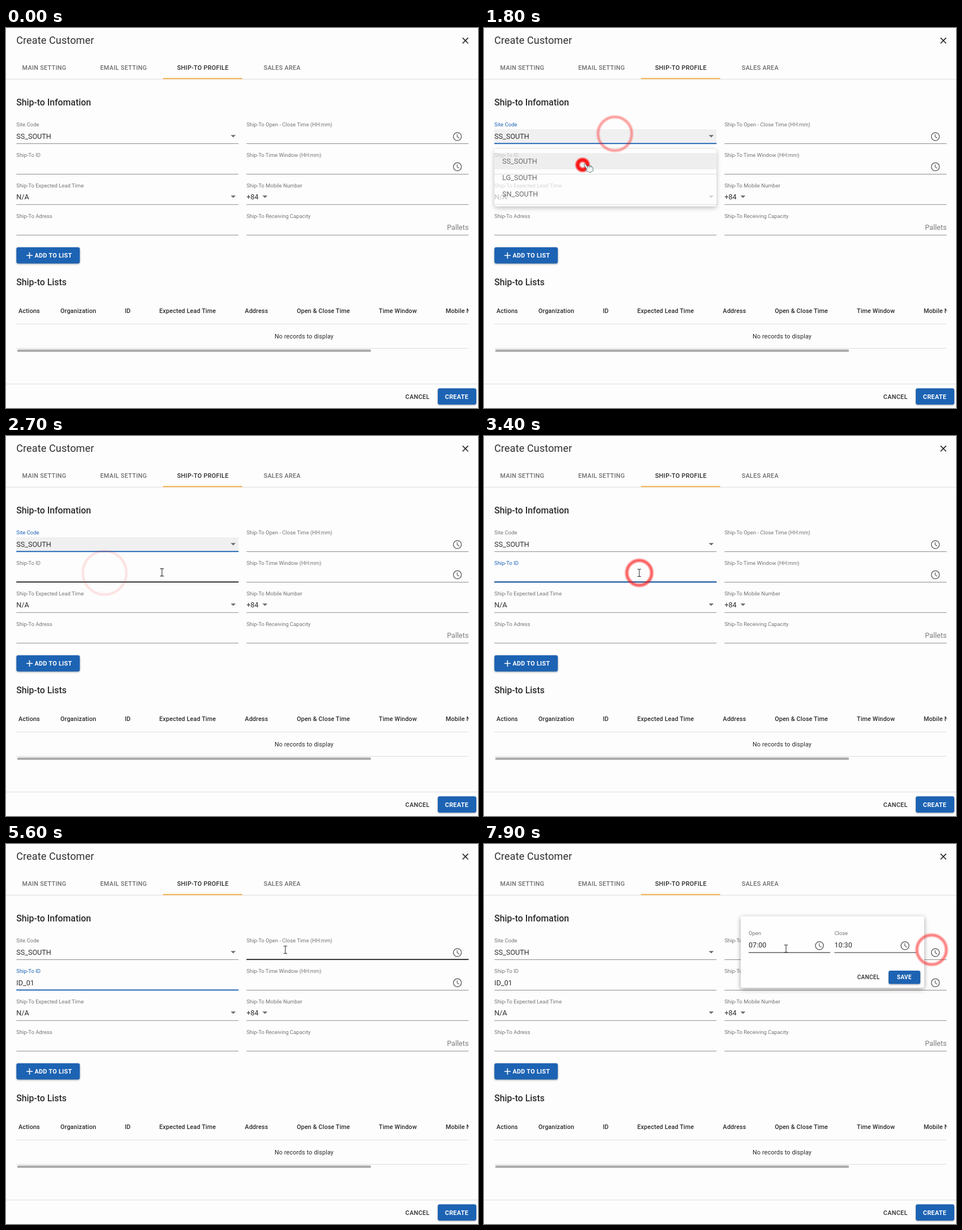
An HTML page that plays this animation: 833x672 px, repeating every 8000 ms.

```html
<!DOCTYPE html>
<html lang="en">
<head>
<meta charset="utf-8">
<title>Create Customer</title>
<style>
  html, body { margin: 0; width: 100%; height: 100%; overflow: hidden; background: #fdfdfd; }
  svg { display: block; width: 100vw; height: 100vh; }
  text { font-family: Roboto, Arial, sans-serif; white-space: pre; }
  .title { font-size: 18px; letter-spacing: .0075em; fill: #2f2f2f; }
  .head { font-size: 15.84px; font-weight: 500; fill: #2b2b2b; }
  .tab, .btn { font-size: 10.8px; font-weight: 500; letter-spacing: .02857em; fill: #6d6d6d; }
  .tab.on, .btn { fill: #2b2b2b; }
  .btn.solid { font-weight: 700; fill: #fff; }
  .btn.small { font-size: 10px; }
  .label { font-size: 9.45px; fill: #757575; }
  .value { font-size: 12.6px; fill: #2e2e2e; }
  .muted { fill: #7b7b7b; }
  .th, .td { font-size: 10.8px; letter-spacing: .01071em; fill: #2b2b2b; }
  .th { font-weight: 500; }
  .blue { fill: #1d63b3; filter: drop-shadow(0 1px 1.5px rgba(0,0,0,.35)); }
  .paper { fill: #fefefe; filter: drop-shadow(0 3px 4px rgba(0,0,0,.25)) drop-shadow(0 1px 3px rgba(0,0,0,.14)); }
</style>
</head>
<body>
<svg id="stage" viewBox="0 0 833 672"></svg>
<script>
const LOOP = 8000, FIELD_W = 392, LEFT = 18.3, RIGHT = 424.4;
const BLUE = '#1c62b4', GREY = '#757575';

const text = (x, y, s, cls, extra = '') => `<text x="${x}" y="${y}" class="${cls}" ${extra}>${s}</text>`;
const rect = (x, y, w, h, attrs) => `<rect x="${x}" y="${y}" width="${w}" height="${h}" ${attrs}/>`;
const button = (x, y, w, h) => rect(x, y, w, h, 'rx="3.4" class="blue"');
const clock = (x, y) => `<g transform="translate(${x} ${y})" fill="none" stroke="#6b6b6b">
  <circle r="7.1" stroke-width="1.5"/><path d="M-.3 -4.2V.4L3.4 2.6" stroke-width="1.3"/></g>`;
const arrow = (x, y, id = '') => `<path id="${id}" d="M-4.4 -2.2H4.4L0 2.2Z" transform="translate(${x} ${y})" fill="#6b6b6b"/>`;

const fields = [
  { id: 'site', x: LEFT, y: 204.5, label: 'Site Code' },
  { id: 'code', x: LEFT, y: 258.5, label: 'Ship-To ID' },
  { id: 'lead', x: LEFT, y: 312.2, label: 'Ship-To Expected Lead Time' },
  { id: 'address', x: LEFT, y: 366.2, label: 'Ship-To Adress' },
  { id: 'open', x: RIGHT, y: 204.5, label: 'Ship-To Open - Close Time (HH:mm)' },
  { id: 'win', x: RIGHT, y: 258.5, label: 'Ship-To Time Window (HH:mm)' },
  { id: 'mobile', x: RIGHT, y: 312.2, label: 'Ship-To Mobile Number' },
  { id: 'cap', x: RIGHT, y: 366.2, label: 'Ship-To Receiving Capacity' }
];
const field = f => text(f.x, f.y - 30.6, f.label, 'label', `id="${f.id}-label"`) +
  rect(f.x, f.y - .5, FIELD_W, 1, 'fill="#8e8e8e"') +
  rect(f.x, f.y - 1.2, FIELD_W, 1.8, `id="${f.id}-hover" fill="#1c1c1c"`) +
  rect(-FIELD_W / 2, -1.2, FIELD_W, 1.9, `id="${f.id}-focus" fill="${BLUE}"`);

const tabs = [[28.6, 'MAIN SETTING'], [166.2, 'EMAIL SETTING'], [302, 'SHIP-TO PROFILE'], [454.8, 'SALES AREA']];
const columns = [[22, 'Actions'], [96, 'Organization'], [209.7, 'ID'], [270.6, 'Expected Lead Time'],
  [421.6, 'Address'], [513.2, 'Open &amp; Close Time'], [658, 'Time Window'], [776, 'Mobile Number']];
const options = ['SS_SOUTH', 'LG_SOUTH', 'SN_SOUTH'];

const stage = document.getElementById('stage');
stage.innerHTML = `
<defs>
  <filter id="soft" x="-50%" y="-50%" width="200%" height="200%"><feGaussianBlur stdDeviation="1"/></filter>
  <clipPath id="table"><rect x="18" y="480" width="798.5" height="95"/></clipPath>
</defs>
${rect(0, 0, 833, 672, 'fill="#fdfdfd"')}
${text(18.2, 28.2, 'Create Customer', 'title')}
<path d="M805.8 17.4L815.6 27.2M815.6 17.4L805.8 27.2" stroke="#222" stroke-width="1.6"/>
${tabs.map(([x, s], i) => text(x, 73.8, s, i === 2 ? 'tab on' : 'tab')).join('')}
${rect(0, 90, 833, 1, 'fill="#dcdcdc"')}
${rect(277, 88.4, 140, 2, 'fill="#f3b14c"')}
${text(18.2, 136.6, 'Ship-to Infomation', 'head')}
${rect(LEFT, 179, FIELD_W, 25, 'id="site-bg" fill="#f0f0f1"')}
${fields.map(field).join('')}
${text(LEFT, 195.5, options[0], 'value')}
${text(LEFT, 249.5, '', 'value', 'id="typed"')}
${text(LEFT, 303, 'N/A', 'value')}
${text(RIGHT, 303, '+84', 'value')}
${text(816.4, 357, 'Pallets', 'value muted', 'text-anchor="end"')}
${arrow(401, 191.4, 'site-arrow')}${arrow(401, 298.4)}${arrow(457, 298.4)}
${clock(796.6, 192)}${clock(796.6, 245.4)}
${rect(0, 0, 1.1, 16.5, 'id="caret" fill="#222"')}
${button(18.3, 387.8, 112, 28.6)}
<path d="M36 402.2H47M41.5 396.7V407.7" stroke="#fff" stroke-width="1.6"/>
${text(50.4, 406.1, 'ADD TO LIST', 'btn solid')}
${text(18.2, 455, 'Ship-to Lists', 'head')}
<g clip-path="url(#table)">
  ${columns.map(([x, s]) => text(x, 504.2, s, 'th')).join('')}
  ${rect(18, 523, 799, 1, 'fill="#dedede"')}
  ${text(474, 548.9, 'No records to display', 'td')}
  ${rect(18, 566, 799, 1, 'fill="#dedede"')}
</g>
${rect(20, 568.6, 624, 4.2, 'rx="1.5" fill="#ababab"')}
${rect(0, 629, 833, 1, 'fill="#dcdcdc"')}
${text(704.8, 655.6, 'CANCEL', 'btn')}
${button(762, 637.2, 68, 28.8)}
${text(774.8, 655.6, 'CREATE', 'btn solid')}
<g id="menu">
  ${rect(18.3, 214, FIELD_W, 101.4, 'rx="3.6" class="paper"')}
  ${rect(18.3, 221.2, FIELD_W, 28.8, 'fill="#e9e9ea"')}
  ${options.map((s, i) => text(32.3, 240 + i * 28.9, s, 'value')).join('')}
</g>
<g id="popover">
  ${rect(453, 127.6, 324, 126.8, 'rx="3.6" class="paper"')}
  ${text(467, 161, 'Open', 'label')}${text(618.4, 161, 'Close', 'label')}
  ${text(467, 183.4, '07:00', 'value')}${text(618.4, 183.4, '10:30', 'value')}
  ${rect(467, 191.3, 144, 1.4, 'id="line-open" fill="#555"')}
  ${rect(618.4, 191.3, 144.4, 1.4, 'id="line-close" fill="#555"')}
  ${clock(592, 179.8)}${clock(743, 179.8)}
  ${text(658.8, 239.2, 'CANCEL', 'btn small')}
  ${button(714, 224, 56, 23.6)}
  ${text(728.8, 239.2, 'SAVE', 'btn solid small')}
</g>
<g id="rings"></g>
<g id="cursor">
  <path id="hand" d="M-1.5 1Q-1.5 -.6 0 -.6Q1.5 -.6 1.5 1V6Q4 5.4 4.8 6.7Q6.6 6.3 7 7.7Q8.4 7.6 8.4 9.5V12.6Q8.4 15 7 17.4H0Q-1 15 -4.3 11Q-5 9 -3.3 9L-1.5 10.4Z
    M1.5 6V9.5M4.6 7V10M7 8V10.5" fill="#eff6f7" stroke="#60747b" stroke-width=".9"/>
  <path id="arrow" d="M0 0V15L3.5 11.7L6 17L8.3 16L5.9 10.8H10.6Z" fill="#fff" stroke="#333" stroke-width=".9"/>
  <path id="beam" d="M-3.2 -6.5H-1Q0 -6.5 0 -5.5Q0 -6.5 1 -6.5H3.2M0 -5.5V5.5M-3.2 6.5H-1Q0 6.5 0 5.5Q0 6.5 1 6.5H3.2" fill="none" stroke="#333" stroke-width="1.1"/>
</g>`;

const $ = id => document.getElementById(id);
const set = (id, name, value) => $(id).setAttribute(name, value);
const show = (id, on) => set(id, 'opacity', +on);
const clamp = v => Math.max(0, Math.min(1, v));
const smooth = p => p * p * (3 - 2 * p);
const easeOut = p => 1 - (1 - p) ** 3;
const within = (t, [a, b]) => t >= a && t < b;
const lastAt = (list, t) => list.filter(k => k[0] <= t).pop();

// time, x, y
const path = [[400, 345, 60], [900, 231, 186], [1250, 231, 186], [1620, 174, 242], [1760, 174, 242],
  [2200, 330, 204], [2750, 274, 242], [5200, 274, 242], [5600, 493, 187], [6300, 493, 187],
  [6800, 745, 191], [7130, 790, 187], [7400, 790, 187], [7900, 533, 185]];
const pointers = [[0, ''], [400, 'hand'], [600, 'arrow'], [780, 'hand'], [2350, 'beam'], [3700, ''],
  [5200, 'beam'], [7000, 'hand'], [7460, 'arrow'], [7580, 'beam']];
const clicks = [[1050, 231, 187], [1685, 174, 242], [2885, 274, 242], [6073, 492, 187], [7264, 790, 187]];
const focus = { site: [1050, 2900], code: [2900, 6090], open: [6090, 7350] };
const typing = [[0, ''], [3700, 'I'], [3900, 'ID'], [4200, 'ID_'], [4300, 'ID_0'], [4400, 'ID_01']];
const carets = [[3900, 4500], [4900, 5400], [6100, 6500], [6700, 7350]];
const MENU = [1050, 1900], POPOVER = 7400;

$('rings').innerHTML = clicks.map(([, x, y], i) =>
  `<circle id="ring${i}" cx="${x}" cy="${y}" fill="none" stroke="#fb1212" filter="url(#soft)"/>`).join('');

function pointerAt(t) {
  const i = path.findIndex(k => k[0] > t);
  if (i < 0) return path[path.length - 1].slice(1);
  if (!i) return path[0].slice(1);
  const a = path[i - 1], b = path[i], p = smooth((t - a[0]) / (b[0] - a[0]));
  return [a[1] + (b[1] - a[1]) * p, a[2] + (b[2] - a[2]) * p];
}

function grow(id, p, opacity, x, y) {
  const sx = .75 + .25 * p, sy = .5625 + .4375 * p;
  set(id, 'transform', `translate(${x} ${y}) scale(${sx} ${sy}) translate(${-x} ${-y})`);
  show(id, opacity);
}

function drawFields(t, x, y, pointer) {
  const blocked = within(t, MENU) || t >= POPOVER;
  for (const f of fields) {
    const span = focus[f.id], on = !!span && within(t, span);
    const over = pointer && !blocked && x > f.x && x < f.x + FIELD_W && y > f.y - 26 && y <= f.y;
    $(f.id + '-label').style.fill = on ? BLUE : GREY;
    show(f.id + '-hover', over);
    show(f.id + '-focus', on);
    const p = on ? easeOut(clamp((t - span[0]) / 200)) : 0;
    set(f.id + '-focus', 'transform', `translate(${f.x + FIELD_W / 2} ${f.y}) scale(${p} 1)`);
  }
  show('site-bg', within(t, [1750, focus.site[1]]));
  set('site-arrow', 'transform', `translate(401 191.4) scale(1 ${within(t, [1050, 1750]) ? -1 : 1})`);
}

function drawCaret(t) {
  const typed = $('typed');
  typed.textContent = lastAt(typing, t)[1];
  show('caret', carets.some(c => within(t, c)));
  const inCode = t < 6000;
  set('caret', 'x', inCode ? LEFT + typed.getComputedTextLength() : RIGHT);
  set('caret', 'y', inCode ? 237 : 183);
}

function drawCursor(t, x, y, pointer) {
  for (const kind of ['hand', 'arrow', 'beam']) show(kind, kind === pointer);
  const pressed = clicks.some(([c]) => within(t, [c - 50, c + 300]));
  const tilt = pointer === 'hand' && pressed ? -32 : 0;
  set('cursor', 'transform', `translate(${x} ${y}) rotate(${tilt})`);
}

function drawRings(t) {
  clicks.forEach(([start], i) => {
    const age = (t - start) / 1000, id = 'ring' + i;
    const alive = age >= 0 && age < 1.15;
    show(id, 0);
    if (!alive) return;
    set(id, 'r', 5 + 33 * age);
    set(id, 'stroke-width', 7.5 - 4 * age);
    set(id, 'opacity', clamp(1.25 * (1 - age / 1.15)));
  });
}

function draw(t) {
  const [x, y] = pointerAt(t), pointer = lastAt(pointers, t)[1];
  drawFields(t, x, y, pointer);
  drawCaret(t);
  const opened = easeOut(clamp((t - MENU[0]) / 200));
  grow('menu', opened, opened * clamp((1920 - t) / 170), 214, 214);
  const popped = easeOut(clamp((t - POPOVER) / 220));
  grow('popover', popped, popped, 615, 191);
  show('line-open', x < 612 ? 1 : .75);
  show('line-close', x > 618 ? 1 : .9);
  drawRings(t);
  drawCursor(t, x, y, pointer);
}

const begin = performance.now();
function tick() {
  draw((performance.now() - begin) % LOOP);
  requestAnimationFrame(tick);
}
tick();
</script>
</body>
</html>
```
